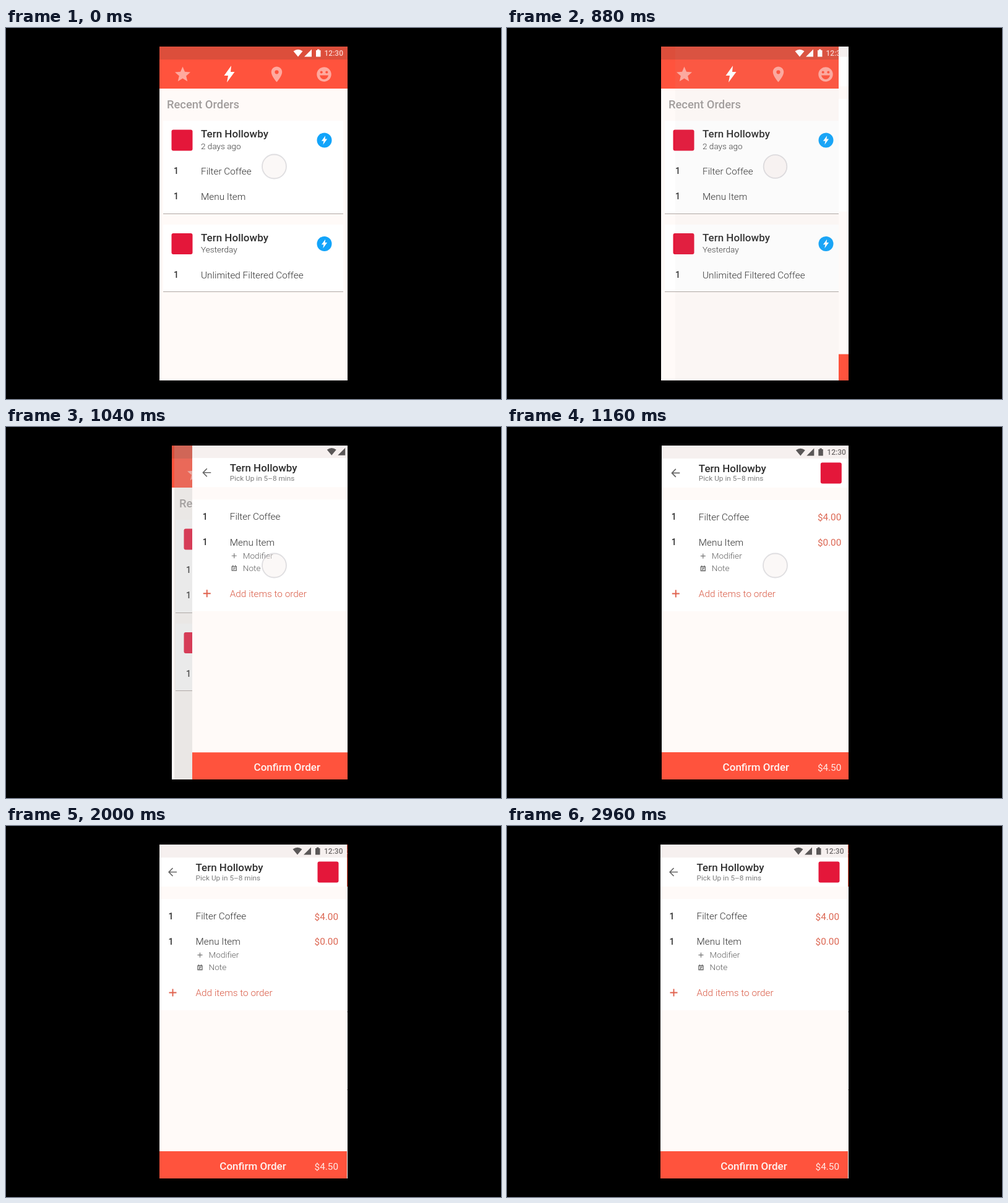
Recreate the animation shown at these times as an HTML page. Size 800 by 600 pixels, loop 2.98 s.

```html
<!DOCTYPE html>
<html lang="en">
<head>
<meta charset="utf-8">
<style>
html, body { margin: 0; width: 100%; height: 100%; overflow: hidden; background: #000; }
svg { display: block; width: 800px; height: 600px; font-family: Roboto, sans-serif; }
.head { font-size: 17px; font-weight: 500; fill: #303030; }
.item { font-size: 15.35px; font-weight: 300; fill: #333; }
.qty { font-size: 14px; font-weight: 500; fill: #303030; }
.when { font-size: 13.6px; font-weight: 300; fill: #3c3c3c; }
.note { font-size: 13.6px; font-weight: 300; fill: #606060; }
.price { font-size: 15.3px; fill: #dc6753; text-anchor: end; }
.clock { font-size: 12px; font-weight: 500; text-anchor: end; }
</style>
</head>
<body>
<svg viewBox="0 0 800 600">
  <defs>
    <clipPath id="phone"><path d="M248 30h304v540h-304z"/></clipPath>
    <clipPath id="sheet"><path d="M247 30h304v540h-304z"/></clipPath>
    <path id="bolt" d="M3-13.5L-8.5 2.5h6.5L-4 13.5 8.5-3.5H2z"/>
    <rect id="logo" width="34" height="34" rx="3" fill="#e4173a"/>
    <g id="badge">
      <circle r="12" fill="#12a4fa"/>
      <use href="#bolt" transform="scale(.54)" fill="#fff"/>
    </g>
    <g id="status">
      <path d="M464.5 37.5q7.5-5.5 15 0l-7.5 9z"/>
      <path d="M482 46.5h12V34.5z"/>
      <path d="M501 36h2v-1.5h3.5V36h2v10.5h-7.5z"/>
    </g>
  </defs>
  <g clip-path="url(#phone)">
    <g id="list">
      <path d="M248 30h304v540h-304z" fill="#fffaf8"/>
      <path d="M248 30h304v21h-304z" fill="#dc4e3b"/>
      <path d="M248 51h304v47h-304z" fill="#ff533d"/>
      <use href="#status" fill="#fff"/>
      <text class="clock" x="545" y="45" fill="#fad0ca">12:30</text>
      <g fill="#ffa99e">
        <path transform="translate(270.5 60) scale(1.25)" d="M12 17.27L18.18 21l-1.64-7.03L22 9.24l-7.19-.61L12 2 9.19 8.63 2 9.24l5.46 4.73L5.82 21z"/>
        <path transform="translate(422.5 60) scale(1.25)" fill-rule="evenodd" d="M12 2C8.13 2 5 5.13 5 9c0 5.25 7 13 7 13s7-7.75 7-13c0-3.87-3.13-7-7-7zm0 9.5a2.5 2.5 0 0 1 0-5 2.5 2.5 0 0 1 0 5z"/>
        <circle cx="514" cy="75" r="11.7"/>
      </g>
      <path d="M507 76.5h14q-1.5 6.5-7 6.5t-7-6.5z" fill="#ff533d"/>
      <circle cx="509.7" cy="71.5" r="2" fill="#ff533d"/>
      <circle cx="518.3" cy="71.5" r="2" fill="#ff533d"/>
      <use href="#bolt" x="361" y="74.5" fill="#fff"/>
      <text x="260" y="130" font-size="18.4" font-weight="500" fill="#a19d9c">Recent Orders</text>
      <path d="M254 150h291v150h-291zM254 318h291v108h-291z" fill="#fff"/>
      <path d="M254 300.5h291M254 426.5h291" stroke="#b0a7a3"/>
      <use href="#logo" x="267.5" y="164.5"/>
      <use href="#logo" x="267.5" y="332"/>
      <use href="#badge" x="514.5" y="181.5"/>
      <use href="#badge" x="514.5" y="349"/>
      <text class="head" x="315" y="177">Tern Hollowby</text>
      <text class="when" x="315" y="195.5">2 days ago</text>
      <text class="qty" x="271" y="236">1</text>
      <text class="item" x="315" y="237">Filter Coffee</text>
      <text class="qty" x="271" y="276.5">1</text>
      <text class="item" x="315" y="277.5">Menu Item</text>
      <text class="head" x="315" y="344.5">Tern Hollowby</text>
      <text class="when" x="315" y="363">Yesterday</text>
      <text class="qty" x="271" y="403.5">1</text>
      <text class="item" x="315" y="404.5">Unlimited Filtered Coffee</text>
    </g>
    <path id="shade" d="M272 30h280v540h-280z" fill="#aaa"/>
    <g id="page" clip-path="url(#sheet)">
      <g id="order">
        <path d="M240 20h311v560h-311z" fill="#fffaf8"/>
        <path d="M240 20h311v31h-311z" fill="#f6f0ef"/>
        <path d="M240 51h311v47h-311zM240 118h311v180h-311z" fill="#fff"/>
        <path d="M240 526h311v54h-311z" fill="#ff533d"/>
        <use href="#status" x="-1" fill="#5a5757"/>
        <text class="clock" x="544.5" y="45" fill="#706c6c">12:30</text>
        <path d="M276 74.5h-12.5M269.5 68l-6.3 6.5 6.3 6.5" fill="none" stroke="#666" stroke-width="1.7"/>
        <text class="head" x="306.5" y="73">Tern Hollowby</text>
        <text x="306.5" y="87.5" font-size="11.8" fill="#7c7c7c">Pick Up in 5–8 mins</text>
        <use href="#logo" x="503.5" y="57.5"/>
        <text class="qty" x="262.5" y="150.5">1</text>
        <text class="item" x="306.5" y="151">Filter Coffee</text>
        <text class="price" x="537" y="151.5">$4.00</text>
        <text class="qty" x="262.5" y="191.5">1</text>
        <text class="item" x="306.5" y="192">Menu Item</text>
        <text class="price" x="537" y="192">$0.00</text>
        <path d="M309.5 208.7h8M313.5 204.7v8" stroke="#777" stroke-width="1.2"/>
        <text class="note" x="327.5" y="213">Modifier</text>
        <path d="M310 226v6.5h7V226M309.4 226h8.2M311.5 224v2M315.5 224v2M312 228.5h3.5M312 230.5h2" fill="none" stroke="#666" stroke-width="1.3"/>
        <text class="note" x="327.5" y="233">Note</text>
        <path d="M263.5 269.5h12M269.5 263.5v12" stroke="#e0614d" stroke-width="1.9"/>
        <text class="item" x="306.5" y="275" style="fill:#d95b46">Add items to order</text>
        <text class="head" x="399" y="556" text-anchor="middle" style="fill:#fff4f2">Confirm Order</text>
        <text class="price" x="537" y="556" style="fill:#ffeae6">$4.50</text>
      </g>
    </g>
  </g>
  <circle id="touch" r="19.5" fill="#f6efee" stroke="#8c8c96" stroke-opacity=".27" stroke-width="1.8"/>
</svg>
<script>
const LOOP = 2980;
const el = id => document.getElementById(id);
const [list, shade, page, order, touch] = ['list', 'shade', 'page', 'order', 'touch'].map(el);
const ramp = (t, a, b) => Math.min(1, Math.max(0, (t - a) / (b - a)));
const bezier = (a, b, u) => 3 * a * u * (1 - u) ** 2 + 3 * b * u * u * (1 - u) + u ** 3;

// Same curve as the CSS "ease" keyword
function ease(x) {
  if (x <= 0 || x >= 1) return x;
  let lo = 0, hi = 1;
  for (let i = 0; i < 24; i++) {
    const mid = (lo + hi) / 2;
    if (bezier(.25, .25, mid) < x) lo = mid; else hi = mid;
  }
  return bezier(.1, 1, lo);
}

function draw(t) {
  const p = ease(ramp(t, 857, 1209)), rest = 1 - p;
  list.setAttribute('transform', `translate(${Math.round(24 * p)} 0)`);
  shade.setAttribute('opacity', .25 * Math.min(1, p * 4) * (1 - ramp(p, .9, 1)));
  page.setAttribute('transform', `translate(${Math.round(305 * rest)} 0)`);

  // The sheet's content trails its edge and settles vertically
  const zoom = 1 + .013 * rest;
  order.setAttribute('transform', `translate(${3 * Math.sqrt(rest)} ${400 * (1 - zoom)}) scale(1 ${zoom})`);

  const press = ramp(t, 700, 820) - ramp(t, 860, 920);
  const drift = (Math.max(0, t - 1600) / 100) ** 1.5;
  touch.setAttribute('transform', `translate(${433.5 + 2.5 * drift} ${224 - 8 * drift}) scale(${1 - .05 * press})`);
  touch.setAttribute('fill-opacity', .45 + .45 * press);
  touch.setAttribute('opacity', 1 - ramp(t, 1720, 1900));
}

function tick() {
  draw(performance.now() % LOOP);
  requestAnimationFrame(tick);
}
tick();
</script>
</body>
</html>
```
